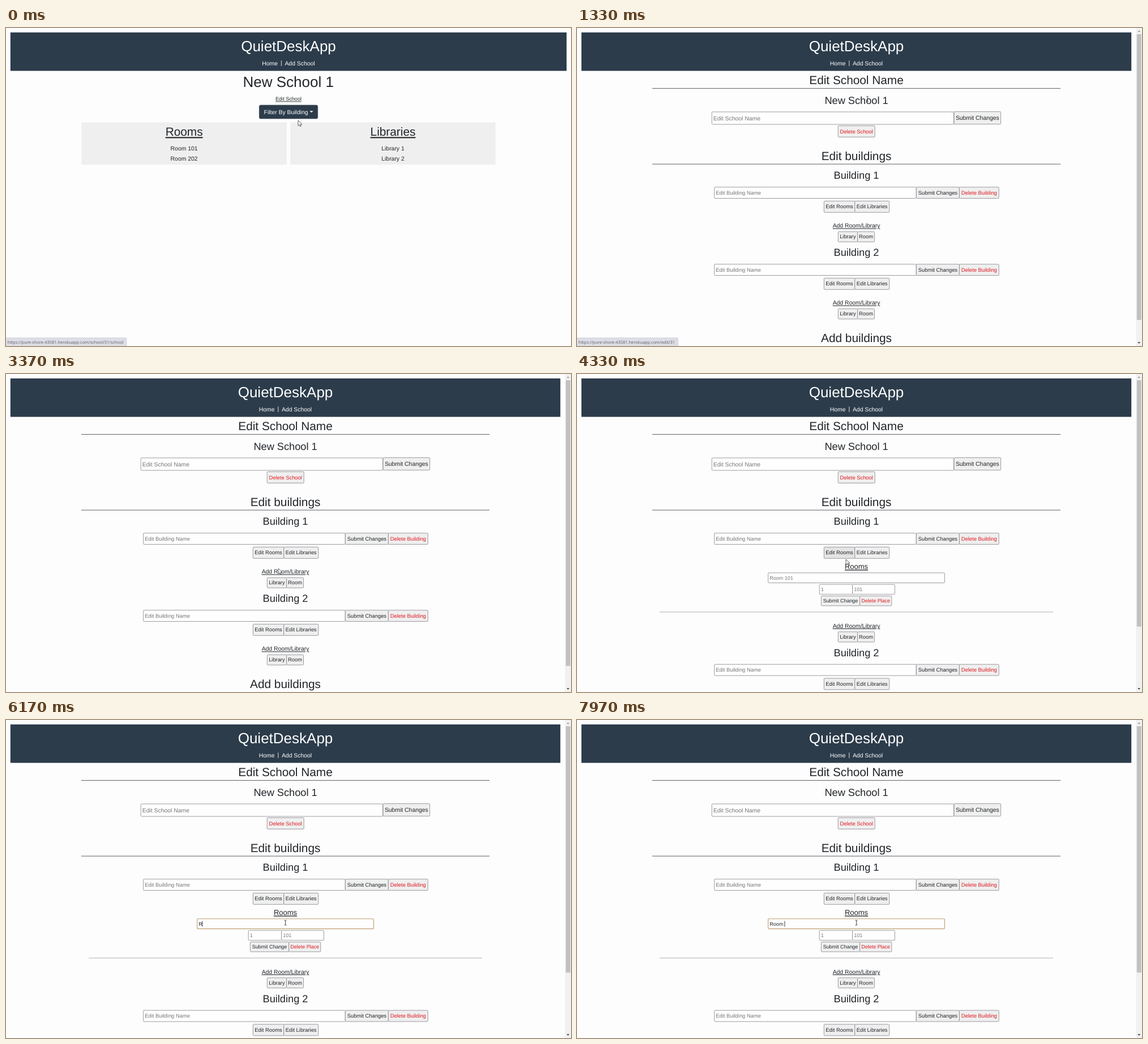
An HTML page for the animation above (8000 ms loop, 998x561 px).

```html
<!DOCTYPE html>
<html lang="en">
<head>
<meta charset="utf-8">
<title>School editor</title>
<style>
  html, body { margin: 0; width: 100%; height: 100%; overflow: hidden; background: #fdfdfd; }
  svg { display: block; width: 100vw; height: 100vh; }
  text {
    font-family: "Liberation Sans", Arial, sans-serif;
    fill: #212529; white-space: pre; text-rendering: geometricPrecision;
  }
  .link { text-decoration: underline; text-underline-offset: .0625em; }
  .status { font-family: "Open Sans", sans-serif; fill: #5c5e64; }
</style>
</head>
<body>
<svg id="stage" viewBox="0 0 998 561"></svg>
<script>
const LOOP = 8000;
const NAVY = '#2c3c4b', INK = '#212529', RED = '#e01b22', GREY = '#777';
const CENTER = 493.5;

// Markup helpers
const text = (x, y, size, str, o = {}) =>
  `<text x="${x}" y="${y}" font-size="${size}" text-anchor="${o.anchor || 'middle'}"` +
  ` class="${o.cls || ''}" style="fill:${o.fill || INK}"${o.id ? ` id="${o.id}"` : ''}>${str}</text>`;
const rect = (x, y, w, h, fill, extra = '') =>
  `<rect x="${x}" y="${y}" width="${w}" height="${h}" fill="${fill}" ${extra}/>`;
const line = (x1, x2, y, color) => rect(x1, y, x2 - x1, 1, color);
const group = (id, body) => `<g id="${id}">${body}</g>`;
const box = (x, y, w, h, fill, id) =>
  rect(x, y, w, h, fill, `rx="1.3" stroke="#85858c" stroke-width=".8"${id ? ` id="${id}"` : ''}`);
const button = (x, y, w, h, size, label, fill = INK, id) =>
  box(x, y, w, h, '#efefef', id) +
  text(x + w / 2, y + h / 2 + size * 0.34, size, label, { fill });
const field = (x, y, w, h, size, hint, id) =>
  box(x, y, w, h, '#fefefe', id && id + 'Box') +
  text(x + 2.6, y + h / 2 + size * 0.34, size, hint, { anchor: 'start', fill: GREY, id });

function header(width) {
  const left = 7.8, mid = left + width / 2, white = { fill: '#fff' };
  return rect(left, 7.8, width, 67.8, NAVY) +
    text(mid, 40.5, 26, 'QuietDeskApp', white) +
    text(mid - 32.9, 65.6, 10.4, 'Home', white) +
    text(mid - 12.7, 65.3, 10.4, '|', white) +
    text(mid + 20, 65.6, 10.4, 'Add School', white);
}

function panel(x, title, rows) {
  const mid = x + 181.3;
  return rect(x, 166.5, 362.5, 74.5, '#efefef') +
    text(mid, 190.3, 20.8, title, { cls: 'link' }) +
    rows.map((r, i) => text(mid, 215.7 + i * 18.7, 10.4, r)).join('');
}

function schoolPage() {
  return header(982.4) +
    text(498.7, 104.2, 26, 'New School 1') +
    text(499, 128.4, 9.1, 'Edit School', { cls: 'link', id: 'editLink' }) +
    rect(447.3, 136, 103.4, 24, NAVY, 'rx="2.6" stroke="#46525e" stroke-width=".7" id="filter"') +
    text(494.6, 151.6, 10.4, 'Filter By Building', { fill: '#fff' }) +
    '<path d="M536.4 146.2h6.2l-3.1 3.1z" fill="#fff"/>' +
    panel(133.3, 'Rooms', ['Room 101', 'Room 202']) +
    panel(502.2, 'Libraries', ['Library 1', 'Library 2']);
}

function addPlace(id) {
  return group(id,
    text(CENTER, 352.4, 10.4, 'Add Room/Library', { cls: 'link' }) +
    button(461.3, 359.3, 34.2, 18, 9.3, 'Library') +
    button(495.5, 359.3, 30, 18, 9.3, 'Room'));
}

function building(n) {
  return text(CENTER, 266.2, 18.2, 'Building ' + n) +
    field(242.6, 280.7, 356.6, 19.8, 9.4, 'Edit Building Name') +
    button(599.4, 280.7, 76, 19.8, 9.4, 'Submit Changes') +
    button(675.4, 280.7, 69.8, 19.8, 9.4, 'Delete Building', RED) +
    button(436.3, 305.3, 54.4, 20, 9.4, 'Edit Rooms', INK, 'rooms' + n) +
    button(490.7, 305.3, 61, 20, 9.4, 'Edit Libraries', INK, 'libs' + n) +
    addPlace('add' + n);
}

function roomForm() {
  return text(CENTER, 344.2, 13, 'Rooms', { cls: 'link' }) +
    field(337.6, 350.8, 311.8, 17.6, 9, 'Room 101', 'roomName') +
    rect(0, 354.6, 0.8, 10, '#111', 'id="caret"') +
    field(428.2, 371.2, 58.4, 17.4, 9, '1') +
    field(486.6, 371.2, 74.8, 17.4, 9, '101') +
    button(431.4, 391.5, 68.2, 17.4, 8.95, 'Submit Change') +
    button(499.6, 391.5, 56.2, 17.4, 8.95, 'Delete Place', RED) +
    line(146, 841, 419.4, '#b2b2b2');
}

function editPage() {
  return header(971.4) +
    text(CENTER, 99.3, 20.8, 'Edit School Name') +
    line(133, 854, 106, '#606066') +
    text(CENTER, 133.7, 18.2, 'New School 1') +
    field(238.2, 148, 427.4, 22, 10.4, 'Edit School Name') +
    button(666, 147.6, 82.6, 22, 10.4, 'Submit Changes') +
    button(461.2, 172.4, 65, 20, 9.4, 'Delete School', RED) +
    text(CENTER, 232.8, 20.8, 'Edit buildings') +
    line(133, 854, 239.6, '#606066') +
    building(1) +
    group('roomForm', roomForm()) +
    group('second', building(2)) +
    group('addBuildings', text(CENTER, 553.6, 20.8, 'Add buildings')) +
    rect(987.5, 0, 10.5, 561, '#f1f1f1') +
    rect(988.8, 11, 8, 504, '#c1c1c1', 'id="thumb"') +
    '<path d="M990.2 7h5l-2.5-3z" fill="#a3a3a3"/><path d="M990.2 554h5l-2.5 3z" fill="#505050"/>';
}

const cursors =
  '<path id="arrow" d="M0 0V9.6L2.3 7.5 3.8 10.8 5.3 10.1 3.9 6.9H7z" fill="#fff" stroke="#222" stroke-width=".7"/>' +
  '<path id="beam" d="M-1.9 -4.4Q0 -4.4 0 -3.4Q0 -4.4 1.9 -4.4M0 -3.6V3.6M-1.9 4.4Q0 4.4 0 3.4Q0 4.4 1.9 4.4" fill="none" stroke="#333" stroke-width=".9"/>' +
  '<path id="hand" d="M-.9 .6Q0 -.7 .9 .6V4.2L4.9 5.2Q6 5.6 5.8 7L5 11.8H-.4L-3.3 7.6Q-3.4 6.2 -1.9 6.8L-.9 7.8z" fill="#fff" stroke="#222" stroke-width=".8" stroke-linejoin="round"/>';

document.getElementById('stage').innerHTML =
  rect(0, 0, 998, 561, '#fdfdfd') +
  group('school', schoolPage()) +
  group('edit', editPage()) +
  group('status',
    rect(-2, 546.5, 0, 16, '#dddde6', 'id="statusBox" rx="1.5" stroke="#cccdd5" stroke-width=".6"') +
    text(2.6, 556.8, 7.41, '', { anchor: 'start', cls: 'status', fill: '#5c5e64', id: 'url' })) +
  group('pointer', cursors);

const $ = id => document.getElementById(id);
const show = (id, on) => $(id).setAttribute('display', on ? 'inline' : 'none');
const set = (id, name, value) => $(id).setAttribute(name, value);
const within = (t, a, b) => t >= a && t < b;

const PAGE_AT = 1300, OPEN_AT = 4230, FOCUS_AT = 5300;
const KEYS = [6100, 6530, 6720, 7030, 7430];
const HOST = 'https://pure-shore-43581.herokuapp.com/';

// Pointer stops: [time, x, y], eased between
const PATH = [
  [0, 516, 163], [300, 516, 163], [900, 514, 128], [1010, 514, 128], [1120, 513, 125],
  [1550, 513, 125], [2020, 517.5, 321], [2500, 517.5, 321], [3150, 481, 343],
  [3700, 481, 343], [4050, 474, 317], [4240, 474, 318], [4330, 475, 327],
  [4900, 493.5, 357.6], [LOOP, 493.5, 357.6]
];

function pointerAt(t) {
  const i = PATH.findIndex(p => p[0] > t);
  const [t0, x0, y0] = PATH[i - 1], [t1, x1, y1] = PATH[i];
  const k = (t - t0) / (t1 - t0), e = k * k * (3 - 2 * k);
  return [x0 + (x1 - x0) * e, y0 + (y1 - y0) * e];
}

function pointerKind(t, y) {
  if (t < PAGE_AT) {
    if (within(y, 136, 160)) return 'hand';
    if (y < 136) return t < 1010 ? 'beam' : 'hand';
    return 'arrow';
  }
  if (t < 1550) return 'beam';
  if (t < OPEN_AT + 60) return within(y, 305, 325) ? 'hand' : 'arrow';
  return y > 350 ? 'beam' : 'arrow';
}

// The address hint lingers a little after the page has changed
function drawStatus(t) {
  const old = t < 450;
  show('status', old || within(t, 870, PAGE_AT + 150));
  $('url').textContent = HOST + (old ? 'school/31/school' : 'edit/31');
  set('statusBox', 'width', old ? 215 : 180.5);
}

function drawRoomField(t) {
  const typed = KEYS.filter(k => k <= t).length;
  const focused = t >= FOCUS_AT;
  const label = $('roomName');
  label.textContent = typed ? 'Room '.slice(0, typed) : 'Room 101';
  label.style.fill = typed ? INK : GREY;
  set('roomNameBox', 'stroke', focused ? '#bd9f70' : '#85858c');
  set('roomNameBox', 'stroke-width', focused ? 1.1 : 0.8);
  const since = t - (typed ? KEYS[typed - 1] : FOCUS_AT);
  show('caret', focused && since % 1000 < 560);
  set('caret', 'x', 340 + (typed ? label.getComputedTextLength() : 0));
}

function draw(t) {
  const edit = t >= PAGE_AT, open = t >= OPEN_AT;
  const [x, y] = pointerAt(t);
  const kind = pointerKind(t, y);

  show('school', !edit);
  show('edit', edit);
  drawStatus(t);
  $('editLink').style.fill = within(t, 860, PAGE_AT) ? '#c5b58f' : INK;
  set('filter', 'fill', !edit && within(y, 136, 160) ? '#26323f' : NAVY);

  show('roomForm', open);
  show('addBuildings', !open);
  set('add1', 'transform', `translate(0 ${open ? 95.5 : 0})`);
  set('second', 'transform', `translate(0 ${open ? 231.5 : 136})`);
  set('thumb', 'height', open ? 434.5 : 504);
  const overButtons = edit && within(y, 305, 325);
  set('libs1', 'fill', overButtons && x > 491 ? '#e4e4e4' : '#efefef');
  set('rooms1', 'fill', (overButtons && x < 491) || within(t, OPEN_AT, 4360) ? '#e4e4e4' : '#efefef');
  drawRoomField(t);

  for (const id of ['arrow', 'beam', 'hand']) show(id, id === kind);
  set('pointer', 'transform', `translate(${x} ${y})`);
}

const start = performance.now();
function tick() {
  draw((performance.now() - start) % LOOP);
  requestAnimationFrame(tick);
}
tick();
</script>
</body>
</html>
```
